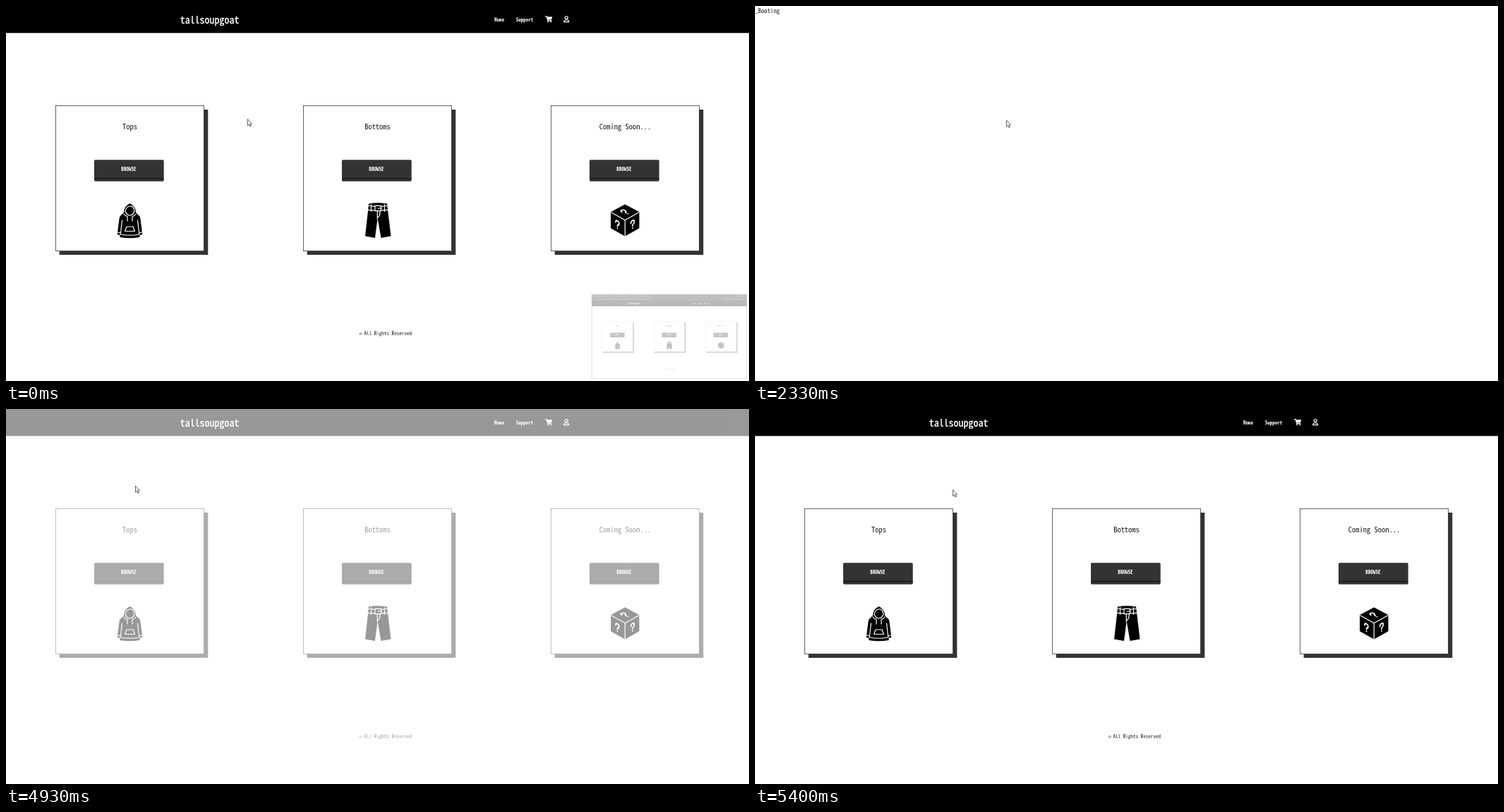
These frames come from a looping animation (1053x532 px, 6.34 s). An HTML page:

```html
<!DOCTYPE html>
<html lang="en">
<head>
<meta charset="utf-8">
<title>Shop intro</title>
<style>
  html, body { margin: 0; width: 100%; height: 100%; overflow: hidden; background: #fff; }
  svg { display: block; width: 100vw; height: 100vh; }
  text { font-family: "Noto Sans Mono CJK JP", "Noto Sans Mono CJK SC", "Noto Sans Mono", monospace; white-space: pre; }
  .line { fill: none; stroke: #fff; stroke-width: 1.2; stroke-linecap: round; stroke-linejoin: round; }
</style>
</head>
<body>
<svg viewBox="0 0 1053 532" preserveAspectRatio="none">
  <defs>
    <g id="hoodie">
      <path d="M167 293Q167 284 175.500 280Q184 284 184 293L188 297Q190 298 190.500 302L193.300 324 189.600 325V328Q175.500 330.500 161.400 328V325L157.700 324 160.500 302Q161 298 163 297Z"/>
      <path class="line" d="M169 291Q170 285 175.500 284T182 291Q180 297 175.500 297T169 291M167 295Q169 298 172 298.500V305M184 295Q182 298 179 298.500V305M164.500 304L162.200 324M186.500 304L188.800 324M162 324Q175.500 326.500 189 324M158.500 321L162 322M192.500 321L189 322M171 313H180L182.500 319.500H168.500Z"/>
    </g>
    <g id="pants">
      <path d="M514 280.500Q527 278 540 280.500L541.500 293 545.500 326.500 531.500 329 526.600 301 523 329 509 326.500 512.800 293Z"/>
      <path class="line" d="M514 283.500L522.500 284.300M531.500 284.300L540 283.500M513.200 289.300L522.500 290.200M531.500 290.200L541 289.300M523 283.300H531.300V290.700H523ZM527 287H533M517.500 281.500V291.500M536.500 281.500V291.500M526.300 291V302M530 291.500Q530.500 298 526.500 300"/>
    </g>
    <path id="mark" class="line" style="stroke-width:2.2" d="M-3-2.500Q-3-5.500 0-5.500T3-2.500Q3-.5 1 .5Q0 1 0 2.500M0 5.500V5.700"/>
    <g id="cube">
      <path stroke="#000" stroke-width="3" stroke-linejoin="round" d="M877.300 283L896 293V314.500L877.300 325 858.600 314.500V293Z"/>
      <path class="line" d="M858 293L877.300 303.800 896.600 293M877.300 303.800V326"/>
      <use href="#mark" transform="matrix(.7 -.4 .8 .45 877 292.300)"/>
      <use href="#mark" transform="matrix(.8 .4 0 .95 866.500 310)"/>
      <use href="#mark" transform="matrix(.8 -.4 0 .95 888 309.500)"/>
    </g>
  </defs>

  <g id="page">
    <rect width="1053" height="38.300"/>
    <g fill="#fff">
      <path d="M766.500 15.200H774.300L773 19.600H767.600Z"/>
      <circle cx="768.200" cy="22.200" r="1"/><circle cx="772.300" cy="22.200" r="1"/>
      <path class="line" d="M764.500 14.700H766.200L767.700 20.600H773"/>
      <circle class="line" cx="794.200" cy="16.500" r="2"/>
      <path class="line" d="M790.700 22.700Q790.700 20 793.200 20H795.200Q797.700 20 797.700 22.700Z"/>
    </g>
    <g id="cards"></g>
    <use href="#hoodie"/><use href="#pants"/><use href="#cube"/>
    <g id="labels"></g>
  </g>

  <g id="thumb">
    <rect x="830" y="409" width="220" height="120" fill="#fff"/>
    <use href="#page" transform="translate(830 418) scale(.2089)"/>
    <rect x="830" y="409" width="220" height="9" fill="#161616"/>
    <path stroke="#777" stroke-width=".7" d="M833 411.500H857M862 411.500H882M887 411.500H914M1034 411.500H1046M839 415.500H914M1017 415.500H1046"/>
    <rect x="830.250" y="409.250" width="219.500" height="119.500" fill="none" stroke="#444" stroke-width=".6"/>
  </g>

  <g id="boot"><rect id="caret" x="35.500" y="8.700" width="3.800" height="1" fill="#222"/></g>
  <path id="pointer" fill="#fff" stroke="#222" stroke-width=".7" stroke-linejoin="round"
    d="M.5.600V9.700L2.500 7.800 3.900 11 5.300 10.400 3.900 7.300H6.500Z"/>
</svg>
<script>
const NS = 'http://www.w3.org/2000/svg';
const $ = id => document.getElementById(id);
const LOOP = 6340, FPS = 15;

function add(parent, tag, attrs) {
  const el = document.createElementNS(NS, tag);
  for (const k in attrs) el.setAttribute(k, attrs[k]);
  return parent.appendChild(el);
}

// Font size is derived from the character advance
const probe = add($('labels'), 'text', { 'font-size': 100 });
probe.textContent = '0000000000';
const em = probe.getComputedTextLength() / 1000 || 0.5;
probe.remove();

function label(parent, str, x, y, advance, opts) {
  add(parent, 'text', { x, y, 'font-size': advance / em, ...opts }).textContent = str;
}

const white = { fill: '#fff', 'font-weight': 700 };
const dark = { fill: '#181818' };
const mid = { 'text-anchor': 'middle' };

['Tops', 'Bottoms', 'Coming Soon...'].forEach((name, i) => {
  const g = add($('cards'), 'g', { transform: `translate(${i * 351} 0)` });
  const box = (x, y, width, height, fill, more) =>
    add(g, 'rect', { x, y, width, height, fill, ...more });
  box(75.7, 147, 210.6, 206, '#333');
  box(70.5, 141.6, 210, 206, '#fff', { stroke: '#222', 'stroke-width': 0.7 });
  box(125, 218.2, 98.7, 30.5, '#333', { rx: 1.6 });
  box(125, 244, 98.7, 1.2, '#151515');
  label(g, name, 175.5, 175.3, 5.24, { ...dark, ...mid });
  label(g, 'BROWSE', 174, 234, 3.55, { ...white, ...mid });
});

const labels = $('labels');
label(labels, 'tallsoupgoat', 246.7, 24.5, 6.98, { fill: '#fff', stroke: '#fff', 'stroke-width': 0.35 });
label(labels, 'Home', 692, 22.3, 3.57, white);
label(labels, 'Support', 722.7, 22.3, 3.52, white);
label(labels, '©', 500.4, 466.5, 2.6, dark);
label(labels, 'All Rights Reserved', 507.4, 467, 3.57, dark);
label($('boot'), '_Booting', 0, 9.5, 4.38, dark);

const clamp = v => Math.min(1, Math.max(0, v));
const ramp = (n, from, to) => clamp((n - from) / (to - from));
const smooth = p => p * p * (3 - 2 * p);

// Pointer strokes: first step, last step, where it comes to rest
const moves = [
  [0, 10, 356, 167], [14, 19, 356, 161.5], [44, 46, 335, 169.3],
  [51, 56, 180, 106.5], [56, 58, 168, 112], [69, 74, 183, 108.4], [74, 79, 280, 114]
];

function pointerAt(n) {
  let x = 342, y = 160;
  for (const [from, to, tx, ty] of moves) {
    const p = smooth(ramp(n, from, to));
    x += (tx - x) * p;
    y += (ty - y) * p;
  }
  return `translate(${x} ${y})`;
}

function show(id, opacity) {
  $(id).setAttribute('opacity', opacity);
  $(id).setAttribute('visibility', opacity > 0 ? 'visible' : 'hidden');
}

function draw(ms) {
  const n = Math.floor((ms % LOOP + 4) * FPS / 1000);
  $('pointer').setAttribute('transform', pointerAt(n));
  show('page', n < 35 ? 1 : ramp(n, 67, 81) ** 1.32);
  show('thumb', 0.27 * (1 - ramp(n, 0, 4.5)));
  show('boot', n >= 35 && n < 65 ? 1 : 0);
  $('caret').setAttribute('width', n < 42 ? 0 : 3.8);
}

let start;
function tick(now) {
  start ??= now;
  draw(now - start);
  requestAnimationFrame(tick);
}
draw(0);
requestAnimationFrame(tick);
</script>
</body>
</html>
```
